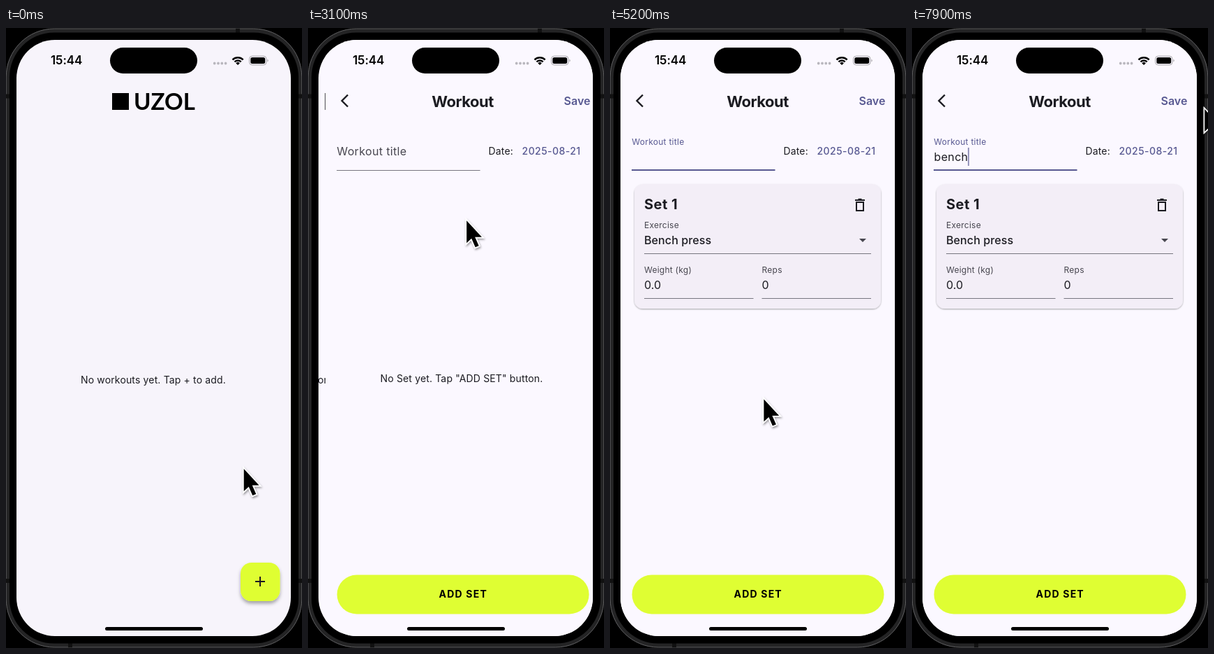
Write an HTML page that moves like this. It is 424 px wide and 886 px high and loops after 8 s.

```html
<!DOCTYPE html>
<html lang="en">
<head>
<meta charset="utf-8">
<title>Workout app</title>
<style>
  html, body { margin: 0; width: 100%; height: 100%; overflow: hidden; background: #000; }
  svg { display: block; width: 424px; height: 886px; }
  text { font-family: Inter, "Open Sans", sans-serif; fill: #1b1b21; white-space: pre; }
  .body { font-size: 14px; letter-spacing: .15px; }
  .input { font-size: 16px; letter-spacing: .35px; }
  .small { font-size: 12px; letter-spacing: .25px; fill: #47464f; }
  .accent { fill: #585992; }
  .rule { stroke: #777680; stroke-width: 1; }
  .lime { fill: #dffe33; }
</style>
</head>
<body>
<svg viewBox="0 0 424 886">
  <defs>
    <clipPath id="screenClip"><rect x="15" y="17" width="393" height="852" rx="55"/></clipPath>
    <filter id="lift" x="-30%" y="-30%" width="160%" height="170%">
      <feDropShadow dx="0" dy="3.5" stdDeviation="2.6" flood-opacity=".34"/>
    </filter>
    <filter id="cardLift" x="-5%" y="-5%" width="110%" height="112%">
      <feDropShadow dx="0" dy="1" stdDeviation="1" flood-opacity=".35"/>
    </filter>
    <filter id="pointerLift" x="-40%" y="-30%" width="200%" height="180%">
      <feDropShadow dx="1" dy="2" stdDeviation="1.6" flood-opacity=".4"/>
    </filter>
  </defs>

  <!-- phone body -->
  <rect width="424" height="886"/>
  <rect x=".2" y="1" width="423.6" height="884" rx="69" fill="#242425" stroke="#616163"/>
  <path d="M0 97.500H6M418 97.500H424M0 790H6M418 790H424M332 1V7M92 879V885" stroke="#111" stroke-width="6"/>
  <rect x="5" y="6.500" width="414" height="873" rx="64"/>

  <g clip-path="url(#screenClip)">
    <rect id="surface" x="15" y="17" width="393" height="852"/>

    <g id="listPage">
      <rect x="152" y="93" width="24" height="24"/>
      <text x="183" y="117" style="font-family:Lato,sans-serif;font-size:33px;font-weight:700;fill:#000">UZOL</text>
      <text class="body" x="107" y="508">No workouts yet. Tap + to add.</text>
      <rect class="lime" x="336" y="764" width="56.500" height="55" rx="15.500" filter="url(#lift)"/>
      <rect id="plusHover" x="336" y="764" width="56.500" height="55" rx="15.500" fill="#1b1b21"/>
      <path d="M357 791H371M364 784V798" stroke="#1b1b21" stroke-width="2"/>
    </g>

    <g id="editPage">
      <rect x="15" y="17" width="393" height="852" fill="#fbf8ff"/>
      <path d="M47 95.500L38.500 104L47 112.500" fill="none" stroke="#1b1b21" stroke-width="2.400"/>
      <text x="211.500" y="113" text-anchor="middle" style="font-size:22px;font-weight:700;letter-spacing:-.5px">Workout</text>
      <text class="accent" x="356.500" y="110" style="font-size:16px;font-weight:600">Save</text>
      <text id="label" class="input">Workout title</text>
      <text id="typed" class="input" x="31.500" y="190"></text>
      <rect id="caret" class="accent" y="171" width="2" height="26"/>
      <rect id="underline" x="31" width="205.500"/>
      <text class="body" x="248.500" y="181">Date:</text>
      <text class="accent" x="296.500" y="181" style="font-size:14px;font-weight:500;letter-spacing:.45px">2025-08-21</text>

      <text id="emptyNote" class="body" x="93.500" y="506">No Set yet. Tap "ADD SET" button.</text>
      <g id="card">
        <rect x="35" y="223.500" width="353" height="177.500" rx="12" fill="#f3eef7" filter="url(#cardLift)"/>
        <text x="49" y="259" style="font-size:20px;font-weight:700;letter-spacing:.5px">Set 1</text>
        <path d="M351 246H365M355.500 244.800H360.500" stroke="#1b1b21" stroke-width="2"/>
        <path d="M353 249H363V261H353Z" fill="none" stroke="#1b1b21" stroke-width="2"/>
        <text class="small" x="49" y="286">Exercise</text>
        <text x="49" y="309" style="font-size:16px;font-weight:500;letter-spacing:.1px">Bench press</text>
        <path d="M357 301H367L362 306Z" fill="#47464f"/>
        <text class="small" x="49" y="350">Weight (kg)</text>
        <text class="small" x="217.500" y="350">Reps</text>
        <text x="49" y="373" font-size="16">0.0</text>
        <text x="217.500" y="373" font-size="16">0</text>
        <path class="rule" d="M49 322.500H374M49 386.500H205.500M217.500 386.500H374"/>
      </g>

      <rect class="lime" x="31.500" y="781.500" width="361" height="56" rx="28"/>
      <rect id="addHover" x="31.500" y="781.500" width="361" height="56" rx="28" fill="#1b1b21"/>
      <text x="177.500" y="814" style="font-size:14px;font-weight:700;letter-spacing:1.2px;fill:#000">ADD SET</text>
    </g>

    <!-- status bar -->
    <text x="64" y="52" style="font-size:17px;font-weight:600;letter-spacing:-.1px;fill:#000">15:44</text>
    <rect x="149" y="28" width="125" height="37" rx="18.500"/>
    <path d="M298.700 50.500H315" stroke="#b9b7be" stroke-width="3.800" stroke-linecap="round" stroke-dasharray="0 5.300"/>
    <g fill="none" stroke="#000" stroke-width="2.500">
      <path d="M324.500 45.300A11 11 0 0 1 339.700 45.300M327.500 48.400A6.800 6.800 0 0 1 336.700 48.400"/>
    </g>
    <path d="M332.100 53L329.300 50.200A4 4 0 0 1 334.900 50.200Z"/>
    <rect x="348.500" y="40.200" width="24.500" height="12.600" rx="4" fill="none" stroke="#a5a3a8"/>
    <rect x="350.300" y="42" width="20.900" height="9" rx="2.500"/>
    <path d="M374.500 44.500Q377 46.500 374.500 48.500Z" fill="#a5a3a8"/>
    <rect x="142" y="856" width="140" height="5" rx="2.500"/>
  </g>

  <g id="pointer" filter="url(#pointerLift)">
    <path d="M1.700 4V36L8.700 29.500L14.200 42L19.200 40L13.700 27.500H23.500Z" stroke="#fff" stroke-width="3.400" paint-order="stroke"/>
  </g>
</svg>
<script>
const LOOP = 8000, STEP = 100;
const OPEN_PAGE = 2800, FOCUS = 3800, ADD_CARD = 5050, TYPING = 6700, KEY_GAP = 150;
const WORD = "bench";

// pointer stops: time, x, y
const STOPS = [
  [0, 339, 626], [250, 350, 774], [800, 78, 30], [1200, 309, 518], [1420, 352, 774],
  [1950, 113, 66], [2400, 406.5, 681], [2750, 384, 800], [3300, 150, 44], [3700, 120, 192],
  [3950, 126, 140], [4350, 378, 786], [4700, 283, 588], [5000, 300, 830], [5450, 105, 102],
  [5700, 113, 182], [6150, 320, 790], [6600, 115, 162], [7250, 350, 784], [7900, 417.5, 112]
];

const el = Object.fromEntries([...document.querySelectorAll("[id]")].map(e => [e.id, e]));
const clamp = v => Math.min(1, Math.max(0, v));
const mix = (a, b, k) => a + (b - a) * k;
const easeOut = k => 1 - (1 - k) ** 3;
const set = (node, attrs) => {
  for (const name in attrs) node.setAttribute(name, attrs[name]);
};
const show = (node, on) => set(node, { visibility: on ? "visible" : "hidden" });

// No overshoot: turning points get a flat tangent.
function slope(i, axis) {
  const prev = STOPS[i - 1], here = STOPS[i], next = STOPS[i + 1];
  if (!prev || !next) {
    const [a, b] = prev ? [prev, here] : [here, next];
    return (b[axis] - a[axis]) / (b[0] - a[0]);
  }
  const before = (here[axis] - prev[axis]) / (here[0] - prev[0]);
  const after = (next[axis] - here[axis]) / (next[0] - here[0]);
  return before * after <= 0 ? 0 : 2 * before * after / (before + after);
}

function pointerAt(t) {
  let i = 0;
  while (i < STOPS.length - 2 && t >= STOPS[i + 1][0]) i++;
  const a = STOPS[i], b = STOPS[i + 1], span = b[0] - a[0];
  const k = (t - a[0]) / span, k2 = k * k, k3 = k2 * k;
  return [1, 2].map(axis =>
    (2 * k3 - 3 * k2 + 1) * a[axis] + (k3 - 2 * k2 + k) * span * slope(i, axis) +
    (3 * k2 - 2 * k3) * b[axis] + (k3 - k2) * span * slope(i + 1, axis));
}

function caretOpacity(t) {
  if (t >= TYPING && t < TYPING + KEY_GAP * WORD.length) return 1;
  const phase = t % 1000;
  return phase < 500 ? clamp((phase - 350) / 100) : clamp((1000 - phase) / 160);
}

function draw(t) {
  const [x, y] = pointerAt(t);
  const over = (left, top, right, bottom) =>
    x > left && x < right && y > top && y < bottom ? .08 : 0;
  set(el.pointer, { transform: `translate(${x} ${y})` });

  const tint = clamp(t / 600);
  set(el.surface, { fill: `rgb(${mix(247, 251, tint)},${mix(244, 248, tint)},${mix(251, 255, tint)})` });

  const push = 1 - (1 - clamp((t - OPEN_PAGE) / 500)) ** 4;
  show(el.listPage, push < 1);
  show(el.editPage, push > 0);
  set(el.listPage, { transform: `translate(${-131 * push} 0)` });
  set(el.editPage, { transform: `translate(${393 * (1 - push)} 0)` });
  set(el.plusHover, { opacity: over(336, 764, 392, 819) });
  set(el.addHover, { opacity: over(31, 781, 392, 838) });

  const focused = t >= FOCUS;
  const lift = easeOut(clamp((t - FOCUS) / 170));
  set(el.label, {
    transform: `translate(31.3 ${mix(182, 167, lift)}) scale(${mix(1, .75, lift)})`,
    style: `fill:${focused ? "#585992" : "#47464f"}`
  });
  set(el.underline, {
    y: focused ? 202 : 203, height: focused ? 2 : 1, fill: focused ? "#585992" : "#777680"
  });

  const count = Math.floor(clamp((t - TYPING + KEY_GAP) / (KEY_GAP * WORD.length)) * WORD.length);
  el.typed.textContent = WORD.slice(0, count);
  set(el.caret, {
    x: 31 + (count ? el.typed.getComputedTextLength() : 0),
    opacity: focused ? caretOpacity(t) : 0
  });

  const added = push > 0 && t >= ADD_CARD;
  el.emptyNote.style.display = added ? "none" : "";
  el.card.style.display = added ? "" : "none";
}

const start = performance.now();
function tick() {
  const t = (performance.now() - start) % LOOP;
  draw(Math.floor(t / STEP) * STEP);
  requestAnimationFrame(tick);
}
draw(0);
requestAnimationFrame(tick);
</script>
</body>
</html>
```
